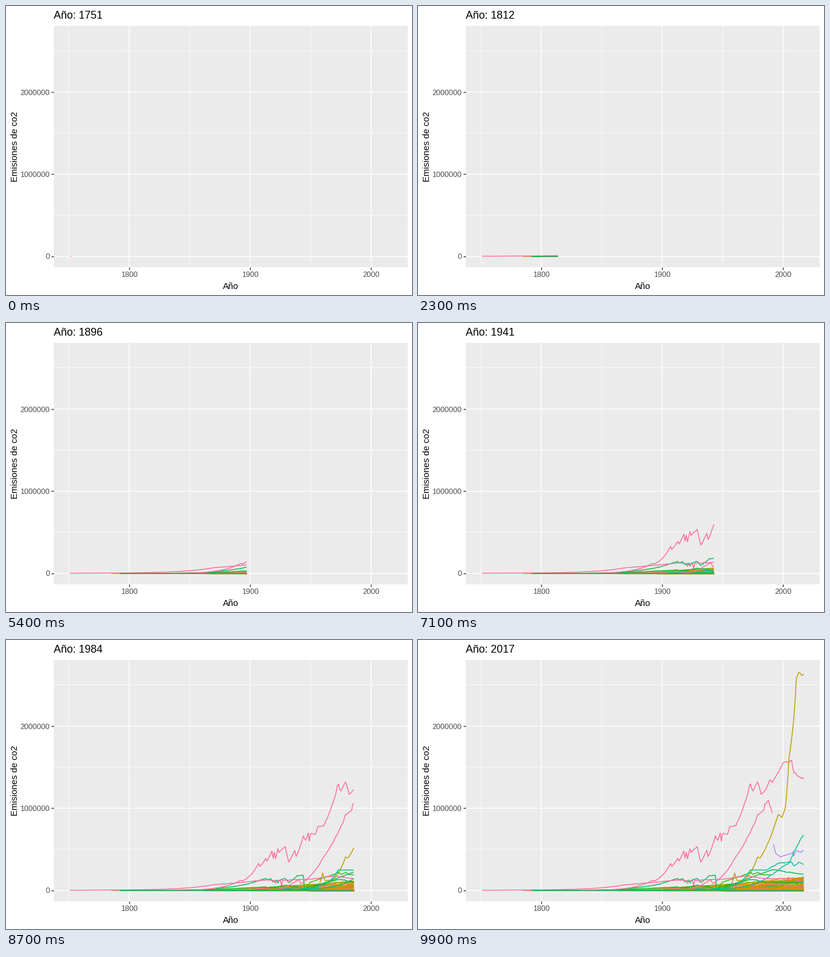
Animation of 672 by 480 pixels, one loop 10 s. Source, as a matplotlib script:

```python
import numpy as np
import matplotlib.pyplot as plt
from matplotlib.animation import FuncAnimation
from matplotlib.collections import LineCollection

W, H, DPI = 672, 480, 96
FRAMES, INTERVAL = 100, 100
FIRST, LAST, PEAK = 1751, 2017, 2670
LEFT, RIGHT, TOP, BOTTOM = 79.3, 664.8, 33.2, 434.2

plt.rcParams["font.family"] = "Liberation Sans"
rng = np.random.default_rng(12)


def hue(frac, lum=65, chroma=100):
    """Evenly spaced HCL hue, converted from polar LUV to sRGB."""
    h = np.radians(15 + 360 * frac)
    u = chroma * np.cos(h) / (13 * lum) + 0.1978
    v = chroma * np.sin(h) / (13 * lum) + 0.4683
    y = ((lum + 16) / 116) ** 3
    xyz = np.array([9 * y * u / (4 * v), y, y * (12 - 3 * u - 20 * v) / (4 * v)])
    rgb = np.array([[3.2406, -1.5372, -0.4986],
                    [-0.9689, 1.8758, 0.0415],
                    [0.0557, -0.2040, 1.0570]]) @ xyz
    rgb = np.clip(rgb, 0, 1)
    return tuple(np.where(rgb <= 0.0031308, 12.92 * rgb,
                          1.055 * rgb ** (1 / 2.4) - 0.055))


def trend(*knots, jitter=0.01):
    """Yearly curve growing exponentially from knot to knot, slightly uneven."""
    x, y = zip(*knots)
    years = np.arange(x[0], x[-1] + 1)
    vals = np.exp(np.interp(years, x, np.log(y)))
    return np.column_stack([years, vals * (1 + rng.normal(0, jitter, len(years)))])


def small_emitter(i):
    """Power-law rise to a skewed random level; early starters are warm or green."""
    early = i % 7 == 0
    start = rng.integers(1860, 1920) if early else rng.integers(1948, 1962)
    size = 180 * rng.random() ** (4 if early else 8)
    years = np.arange(start, LAST + 1)
    rise = ((years - start) / (LAST - start)) ** rng.uniform(0.8, 2)
    swing = 1 + 0.06 * np.sin(years * rng.uniform(0.2, 0.9)) + rng.normal(0, 0.03, len(years))
    return rng.random() * (0.35 if early else 1), np.column_stack([years, size * rise * swing])


uk = trend((1751, 2.5), (1800, 7), (1830, 16), (1850, 33), (1870, 70), (1897, 105),
           (1913, 128), (1920, 120), (1921, 88), (1922, 115), (1925, 120), (1926, 62),
           (1927, 125), (1950, 137), (1970, 178), (1984, 145), (2008, 142), (2017, 104))

usa = trend((1800, 0.1), (1850, 5.4), (1880, 54), (1892, 122), (1894, 116), (1900, 181),
            (1907, 328), (1908, 290), (1913, 390), (1914, 362), (1918, 475), (1919, 395),
            (1920, 465), (1921, 387), (1923, 510), (1924, 467), (1929, 535), (1932, 345),
            (1937, 487), (1938, 410), (1944, 660), (1946, 610), (1948, 697), (1949, 592),
            (1950, 695), (1954, 680), (1956, 778), (1961, 790), (1967, 1000), (1973, 1300),
            (1975, 1205), (1979, 1338), (1982, 1180), (1986, 1225), (1989, 1355),
            (1991, 1310), (2000, 1552), (2007, 1580), (2009, 1428), (2017, 1350),
            jitter=0.006)

ussr = trend((1830, 0.1), (1870, 2), (1913, 30), (1920, 8), (1934, 80), (1940, 132),
             (1942, 85), (1950, 182), (1960, 390), (1970, 630), (1979, 915), (1984, 975),
             (1985, 1050), (1988, 1078), (1991, 948), jitter=0.006)

china = trend((1899, 0.1), (1941, 24), (1949, 16), (1957, 70), (1960, 212), (1962, 120),
              (1968, 125), (1979, 408), (1981, 395), (1990, 662), (1996, 930), (1999, 890),
              (2002, 1010), (2005, 1600), (2009, 2105), (2011, 2565), (2013, 2668),
              (2016, 2603), (2017, 2650), jitter=0.004)

# Straight stretch between the two parts while the country was split.
germany = np.vstack([
    trend((1792, 0.1), (1850, 3), (1870, 24), (1897, 75), (1907, 120), (1913, 146),
          (1914, 128), (1917, 144), (1919, 103), (1922, 128), (1923, 92), (1924, 124),
          (1929, 148), (1932, 98), (1939, 180), (1944, 182), (1945, 3)),
    trend((1991, 253), (2007, 218), (2017, 196))])

west_germany = trend((1946, 42), (1950, 102), (1960, 152), (1973, 220), (1975, 196),
                     (1979, 220), (1982, 192), (1990, 190))

france = trend((1792, 0.3), (1850, 5), (1870, 14), (1897, 31), (1913, 43), (1914, 28),
               (1929, 63), (1938, 52), (1944, 18), (1950, 55), (1973, 137), (1985, 105),
               (2017, 92), jitter=0.02)

india = trend((1858, 0.1), (1900, 3), (1950, 18), (1970, 53), (1990, 186), (1999, 285),
              (2005, 335), (2009, 472), (2014, 612), (2017, 670), jitter=0.006)

japan = trend((1868, 0.1), (1900, 5), (1940, 40), (1945, 16), (1960, 63), (1973, 250),
              (1986, 248), (1996, 332), (2007, 345), (2009, 300), (2013, 341), (2017, 315))

russia = trend((1992, 568), (1994, 455), (1998, 408), (2008, 460), (2009, 430),
               (2011, 485), (2015, 468), (2017, 492), jitter=0.008)

canada = trend((1785, 0.1), (1870, 1), (1920, 21), (1970, 92), (2000, 145), (2017, 155),
               jitter=0.02)

belgium = trend((1802, 0.5), (1850, 3), (1897, 14), (1930, 27), (1944, 12), (1973, 38),
                (2017, 27), jitter=0.02)

# Hue position around the wheel, then the curve in thousands of tonnes.
curves = sorted([small_emitter(i) for i in range(190)], key=lambda c: -c[0])
curves += [(0.725, russia), (0.14, belgium), (0.155, canada), (0.165, china),
           (0.32, france), (0.30, west_germany), (0.36, germany), (0.42, india),
           (0.435, japan), (0.945, ussr), (0.945, uk), (0.947, usa),
           (0.345, np.array([[1792, 0.1], [LAST, 0.6]]))]
colors = [hue(frac) for frac, _ in curves]

fig = plt.figure(figsize=(W / DPI, H / DPI), dpi=DPI, facecolor="white")
ax = fig.add_axes([LEFT / W, 1 - BOTTOM / H, (RIGHT - LEFT) / W, (BOTTOM - TOP) / H],
                  facecolor="#EBEBEB")
pad = 0.05 * (LAST - FIRST)
ax.set_xlim(FIRST - pad, LAST + pad)
ax.set_ylim(-0.05 * PEAK, 1.05 * PEAK)
ax.set_xticks([1800, 1900, 2000])
ax.set_xticks([1750, 1850, 1950], minor=True)
ax.set_yticks([0, 1000, 2000])
ax.set_yticks([500, 1500, 2500], minor=True)
ax.set_axisbelow(True)
ax.grid(which="major", color="white", lw=1.07, snap=False)
ax.grid(which="minor", color="white", lw=0.53, snap=False)
ax.tick_params(length=2.75, width=1.07, color="#333333", labelbottom=False, labelleft=False)
ax.tick_params(which="minor", length=0)
for spine in ax.spines.values():
    spine.set_visible(False)


def label(x, y, text, size, color="black", **kw):
    return fig.text(x / W, 1 - y / H, text, fontsize=size, color=color, va="baseline", **kw)


for k in range(3):
    label(204 + 200.1 * k, 450.5, str(1800 + 100 * k), 9.4, "#4D4D4D", ha="center")
    label(72.3, 420.5 - 136.5 * k, str(1000000 * k), 9.4, "#4D4D4D", ha="right")
label(371.5, 470, "Año", 11, ha="center")
label(19, 233.5, "Emisiones de co2", 11.1, ha="center", rotation=90, rotation_mode="anchor")
title = label(79, 21, "", 13.3)

lines = LineCollection([], linewidths=1.07)
ax.add_collection(lines, autolim=False)


def reveal(points, now):
    seen = points[points[:, 0] <= now]
    if len(seen) < len(points):
        tip = [now, np.interp(now, *points.T)]
        seen = np.vstack([seen, tip])
    return seen


def update(i):
    year = FIRST + (LAST - FIRST) * i / (FRAMES - 1)
    now = min(year + 1, LAST)
    shown = [(reveal(pts, now), c) for (_, pts), c in zip(curves, colors) if pts[0, 0] < now]
    lines.set_segments([s for s, _ in shown])
    lines.set_color([c for _, c in shown])
    title.set_text(f"Año: {int(year + 1e-6)}")
    return lines, title


anim = FuncAnimation(fig, update, frames=FRAMES, interval=INTERVAL, repeat=True,
                     repeat_delay=0, init_func=lambda: update(0))
plt.show()
```
